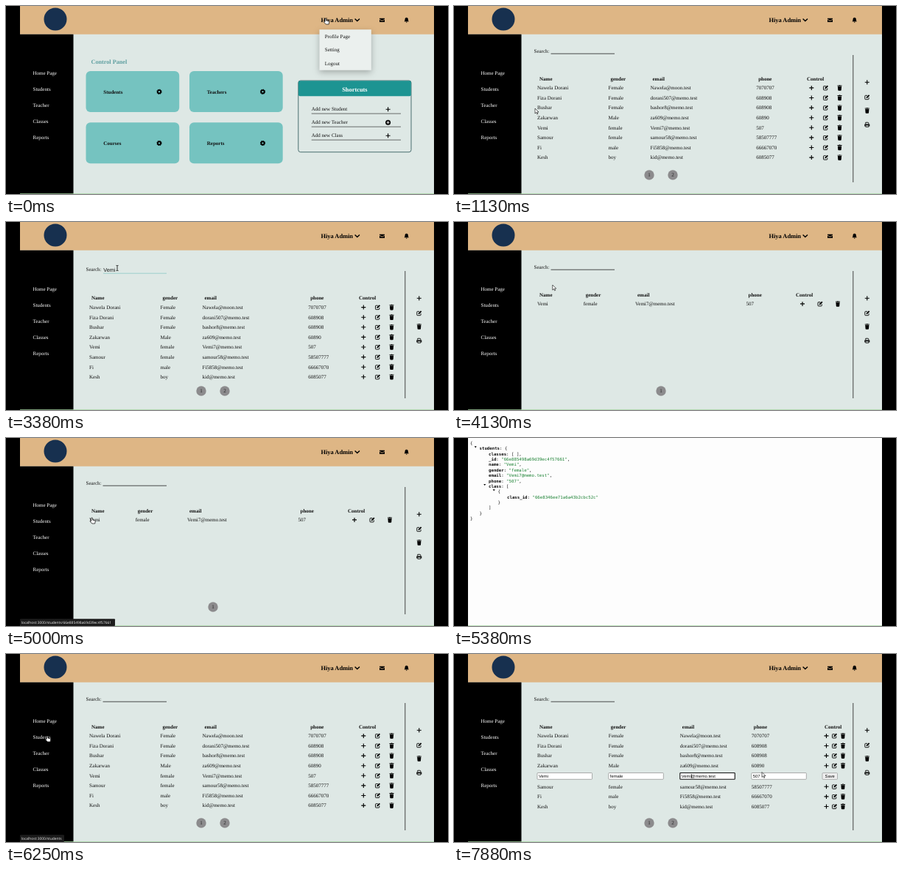
These frames come from a looping animation (600x257 px, 8 s). An HTML page:

```html
<!DOCTYPE html>
<html lang="en">
<head>
<meta charset="utf-8">
<title>School control panel</title>
<style>
  html, body { margin: 0; width: 100%; height: 100%; overflow: hidden; background: #000; }
  svg { display: block; width: 100vw; height: 100vh; }
  text { font-family: "Liberation Serif", "Times New Roman", serif; font-size: 7px; white-space: pre; text-rendering: geometricPrecision; }
  .bold { font-weight: bold; }
  .title { font-weight: bold; font-size: 8.4px; }
  .sans { font-family: "Liberation Sans", Arial, sans-serif; font-size: 5.83px; }
  .query { font-family: "Liberation Sans", Arial, sans-serif; font-size: 7.2px; }
  .status { font-family: "Open Sans", sans-serif; font-size: 4.93px; }
  .code { font-family: "DejaVu Sans Mono", monospace; font-size: 5.72px; }
</style>
</head>
<body>
<svg id="stage" viewBox="0 0 600 257" preserveAspectRatio="none"></svg>
<script>
const LOOP = 8000;
const BODY = '#dee8e5';

const rect = (x, y, w, h, fill, more = '') =>
  `<rect x="${x}" y="${y}" width="${w}" height="${h}" fill="${fill}" ${more}/>`;
const text = (x, y, str, cls = '', fill = '#111', more = '') =>
  `<text x="${x}" y="${y}" class="${cls}" fill="${fill}" ${more}>${str}</text>`;
const line = (x1, y1, x2, y2, color = '#222', width = 0.8) =>
  `<path d="M${x1} ${y1}L${x2} ${y2}" stroke="${color}" stroke-width="${width}"/>`;
const solid = d => `<path d="${d}"/>`;
const stroke = (d, width) => `<path d="${d}" fill="none" stroke="#000" stroke-width="${width}"/>`;

const ICONS = {
  plus: stroke('M0-3V3M-3 0H3', 1.1),
  edit: stroke('M.3-2.4H-2.2Q-3-2.4-3-1.6V2.2Q-3 3-2.2 3H1.5Q2.3 3 2.3 2.2V.4', 0.9) +
    solid('M-1.2 1.3l.3-1.6L2.2-3.4l1.3 1.3L.4 1Z'),
  trash: solid('M-3-3.4h2l.4-.5h1.2l.4.5h2v.9h-6ZM-2.6-2h5.2l-.4 5q-.1.8-.8.8h-2.8q-.7 0-.8-.8Z'),
  print: stroke('M-2-.8V-3H1.4L2-2.4V-.8', 0.9) + solid('M-3.5-.6h7v2.8h-1.1v-1.2h-4.8v1.2h-1.1Z') +
    stroke('M-2 1.2V3H2V1.2', 0.9),
  gear: '<g fill="none" stroke="#000"><circle r="2.1" stroke-width="1.8"/>' +
    '<circle r="3" stroke-width="1.2" stroke-dasharray="1.3 1.056"/></g>',
  add: '<circle r="3.5"/><path d="M0-2V2M-2 0H2" stroke="#fff" stroke-width=".9"/>',
  mail: solid('M-3.5-2.6h7v1L0 .6-3.5-1.6ZM-3.5-.7 0 1.5 3.5-.7v3.3h-7Z'),
  bell: solid('M0-3.5c-1.6.2-2.2 1.4-2.2 2.7 0 1.6-.5 2-1 2.8h6.4c-.5-.8-1-1.2-1-2.8 0-1.3-.6-2.5-2.2-2.7ZM-.9 2.5h1.8q-.1 1-.9 1t-.9-1Z'),
  chevron: stroke('M-3.2-1.6L0 1.6L3.2-1.6', 1.4),
  hand: '<path d="M-.9.9a.9.9 0 0 1 1.8 0V3l2.8.6q1.1.3 1 1.5L4.2 8H.3L-2.4 5q-.2-1.1.8-1L-.9 4.6Z" fill="#fff" stroke="#000" stroke-width=".7"/>',
  arrow: '<path d="M0 0V7l1.7-1.6L2.8 7.9l1.1-.5L2.8 5H5Z" fill="#fff" stroke="#000" stroke-width=".6"/>',
  beam: stroke('M-1.5-3.6Q0-3.6 0-3V3Q0 3.6-1.5 3.6M1.5-3.6Q0-3.6 0-3M0 3Q0 3.6 1.5 3.6', 0.8)
};
const icon = (name, x, y) => `<g transform="translate(${x} ${y})">${ICONS[name]}</g>`;

const PEOPLE = [
  ['Nawela Dorani', 'Female', 'Nawela@moon.test', '7070707'],
  ['Fiza Dorani', 'Female', 'dorani507@memo.test', '608908'],
  ['Bushar', 'Female', 'bashor8@memo.test', '608908'],
  ['Zakarwan', 'Male', 'za609@memo.test', '60890'],
  ['Vemi', 'female', 'Vemi7@memo.test', '507'],
  ['Samour', 'female', 'samour58@memo.test', '58507777'],
  ['Fi', 'male', 'Fi5858@memo.test', '66667070'],
  ['Kesh', 'boy', 'kid@memo.test', '6085077']
];
const MORE_PEOPLE = [
  ['Tolvi', 'vwtqn', 'vwtq@memo.test', '60858072'],
  ['kesh', 'baby', 'tiny@moonup.test', '700'],
  ['Vintoa', 'Female', 'vint@memo.test', '5072705'],
  ['DORN', 'Male', 'd609@memo.test', '585858'],
  ['oneUser', 'Male', 'one808@memo.test', '705055858']
];
// Column starts, then the three icon centres.
const TABLES = {
  first: { rows: PEOPLE, cols: [113, 209.5, 266.5, 410.2], head: 479, icons: [485.3, 504.5, 523.5] },
  second: { rows: MORE_PEOPLE, cols: [113, 183.8, 247.8, 387], head: 471.5, icons: [479, 500.7, 522.3] },
  found: { rows: [PEOPLE[4]], cols: [113, 175.7, 246, 396.5], head: 464, icons: [473, 497, 521] },
  edit: { rows: PEOPLE, cols: [113, 209.8, 306.8, 403.8], head: 503, icons: [505.5, 516.5, 528] }
};
const EDIT_ROW = 4;

function shell() {
  const links = ['Home Page', 'Students', 'Teacher', 'Classes', 'Reports'];
  return rect(19, 0, 562, 257, BODY) + rect(19, 0, 562, 38.7, '#deb685') +
    rect(18, 38.7, 73.5, 219, '#000') +
    '<circle cx="67" cy="18" r="15.5" fill="#17304f"/>' +
    text(427.5, 22, 'Hiya Admin', 'title', '#000') +
    icon('chevron', 476.8, 19) + icon('mail', 510.5, 19.3) + icon('bell', 543.7, 19.3) +
    links.map((s, i) => text(36.5, 94 + 22 * i, s, '', '#fff')).join('');
}

function dashboard(menuOpen) {
  const cards = ['Students', 'Teachers', 'Courses', 'Reports'].map((s, i) => {
    const x = 108.5 + 140.5 * (i % 2), y = 89 + 70.3 * (i >> 1);
    return rect(x, y, 126.7, 56, '#75c3c0', 'rx="6"') + text(x + 23.8, y + 30.5, s, 'bold') +
      icon('gear', x + 99.5, y + 28.2);
  }).join('');
  const shortcuts = rect(396.8, 102, 153.2, 97.7, 'none', 'rx="3" stroke="#4b6f70"') +
    rect(397, 102.3, 152.8, 20.9, '#1d9492', 'rx="2"') +
    text(473.4, 116.8, 'Shortcuts', 'title', '#fff', 'text-anchor="middle"') +
    ['Student', 'Teacher', 'Class'].map((s, i) => {
      const y = 143.2 + 18 * i;
      return text(414.7, y, 'Add new ' + s) + line(414.7, y + 3.9, 536, y + 3.9, '#333', 0.7) +
        icon(i === 1 ? 'add' : 'plus', 518.6, y - 2);
    }).join('');
  const menu = rect(425.5, 32.2, 70.3, 55.5, '#ebf0ee', 'style="filter:drop-shadow(0 3px 4px #0004)"') +
    ['Profile Page', 'Setting', 'Logout'].map((s, i) => text(432.8, 44 + 18.3 * i, s)).join('');
  return text(115.5, 79, 'Control Panel', 'title', '#5f9fa0', 'style="font-size:8.2px"') +
    cards + shortcuts + (menuOpen ? menu : '');
}

function searchBox(focused, query) {
  return focused
    ? text(108.5, 67.4, 'Search:') + line(132, 70.2, 218, 70.2, '#8cc9c6') + text(132.3, 67.6, query, 'query')
    : text(108.5, 64.4, 'Search:') + line(131.5, 65.2, 218, 65.2);
}

function editRow(row, cols, y, tick) {
  const trimmed = tick >= 61, active = tick >= 59;
  const values = trimmed ? row.map(s => s.replace('7@', '@')) : row;
  const fields = values.map((s, i) => {
    const border = active && i === 2 ? 'stroke="#111" stroke-width="1.1"' : 'stroke="#8c8c8c" stroke-width=".7"';
    return rect(cols[i], y - 4.5, 74.5, 8.8, '#fff', border + ' rx=".8"') + text(cols[i] + 2, y + 2, s, 'sans');
  }).join('');
  const caretX = trimmed ? 322.3 : 325.5;
  return fields + (active ? line(caretX, y - 3, caretX, y + 3, '#000', 0.7) : '') +
    rect(500, y - 4.4, 20.5, 8.8, '#efefef', 'rx="1" stroke="#888" stroke-width=".6"') +
    text(510.2, y + 2, 'Save', 'sans', '#111', 'text-anchor="middle"');
}

function studentsPage(kind, tick) {
  const { rows, cols, head, icons } = TABLES[kind];
  const focused = tick >= 24 && tick < 29;
  const top = focused ? 4.7 : 0;
  const query = tick < 26 ? '' : tick < 27 ? 'Ve' : 'Vemi';
  let out = searchBox(focused, query) + line(541.8, 67, 541.8, 241, '#333', 0.9) +
    ['plus', 'edit', 'trash', 'print'].map((s, i) => icon(s, 560.8, [104.3, 124.7, 143, 162.2][i])).join('');
  ['Name', 'gender', 'email', 'phone'].forEach((s, i) => out += text(cols[i] + 3, 101.6 + top, s, 'bold'));
  out += text(head, 101.6 + top, 'Control', 'bold');
  rows.forEach((row, i) => {
    const editing = kind === 'edit';
    const y = 111.9 + top + 13.6 * i + (editing && i > EDIT_ROW ? 1.4 : 0);
    if (editing && i === EDIT_ROW) { out += editRow(row, cols, y + 0.7, tick); return; }
    row.forEach((s, c) => out += text(cols[c], y + 2.3, s));
    ['plus', 'edit', 'trash'].forEach((s, c) => out += icon(s, icons[c], y));
  });
  const hovered = tick >= 13 && tick <= 16 ? 1 : tick >= 17 && tick <= 20 ? 0 : -1;
  (kind === 'found' ? [281] : [265, 297]).forEach((x, i) => {
    out += `<circle cx="${x}" cy="231" r="6.7" fill="${i === hovered ? '#555657' : '#8c8b8d'}"/>` +
      text(x, 233.4, i + 1, '', '#222', 'text-anchor="middle"');
  });
  return out;
}

function jsonPage() {
  const [name, gender, email, phone] = PEOPLE[EDIT_ROW];
  // Depth, key, string value or bracket, foldable.
  const lines = [
    [0, '', '{'], [1, 'students', '{', 1], [2, 'classes', '[ ],'],
    [2, '_id', '"66e885498a69d39ec4f57661"'], [2, 'name', `"${name}"`], [2, 'gender', `"${gender}"`],
    [2, 'email', `"${email}"`], [2, 'phone', `"${phone}"`], [2, 'class', '[', 1], [3, '', '{', 1],
    [4, 'class_id', '"66e8346ee71a6a43b2cbc52c"'], [3, '', '}'], [2, '', ']'], [1, '', '}'], [0, '', '}']
  ];
  return rect(19, 0, 562, 257, '#fdfdfd') + lines.map(([depth, key, value, fold], i) => {
    const x = 22 + 12.5 * depth, y = 7 + 7.36 * i;
    const quoted = value[0] === '"';
    const label = key && `<tspan font-weight="bold">${key}</tspan>: `;
    const shown = quoted ? `<tspan fill="#1c8234">${value}</tspan>` : value;
    const comma = quoted && key !== 'class_id' ? ',' : '';
    return text(x, y + 2, label + shown + comma, 'code') +
      (fold ? `<path d="M${x - 6.8} ${y - 3}h3l-1.5 2.2Z"/>` : '');
  }).join('');
}

function statusBar(path) {
  const width = path.length > 12 ? 129 : 60;
  return rect(19, 247.3, width, 9.7, '#1c1c1c', 'rx="1"') +
    text(20.8, 254.2, 'localhost:3000/' + path, 'status', '#f2f2f2');
}

// Pointer path: step, x, y, shape kept until the next entry.
const POINTER = [
  [0, 434, 17, 'hand'], [1, 405, 32, 'arrow'], [4, 57, 112, 'hand'], [8, 57, 112, 'hand'], [9, 110, 140, 'arrow'],
  [13, 295, 229, 'hand'], [16, 295, 229, 'hand'], [17, 265, 230, 'hand'], [20, 265, 230, 'hand'],
  [21, 245, 195, 'arrow'], [24, 151, 63, 'beam'], [30, 151, 63, 'arrow'], [36, 116.5, 109, 'hand'],
  [41, 116.5, 109, 'arrow'], [42, 38, 8, 'arrow'], [43, 0, 0, ''], [46, 30, 2, 'arrow'], [49, 56, 112, 'hand'],
  [51, 56, 112, 'hand'], [52, 150, 135, 'arrow'], [55, 504, 165, 'hand'], [56, 504, 165, 'arrow'],
  [59, 345, 167, 'beam'], [61, 345, 167, 'arrow'], [63, 418, 161.5, 'arrow']
];
function pointer(tick) {
  const i = POINTER.findLastIndex(p => p[0] <= tick);
  const a = POINTER[i], b = POINTER[i + 1] || a;
  if (!a[3]) return '';
  const k = b[3] && b !== a ? (tick - a[0]) / (b[0] - a[0]) : 0;
  return icon(a[3], a[1] + (b[1] - a[1]) * k, a[2] + (b[2] - a[2]) * k);
}

// Screen shown from each step on.
const SCREENS = [
  [0, 'dashboard'], [7, 'first'], [15, 'second'], [18, 'first'], [29, 'found'], [41, 'json'], [46, 'first'], [56, 'edit']
];
function scene(tick) {
  const screen = SCREENS.findLast(s => s[0] <= tick)[1];
  let out;
  if (screen === 'json') out = jsonPage();
  else out = shell() + (screen === 'dashboard' ? dashboard(tick < 2) : studentsPage(screen, tick));
  out += line(19, 256.6, 581, 256.6, '#a5d6a0', 0.8);
  if ((tick >= 4 && tick < 9) || (tick >= 49 && tick < 52)) out += statusBar('students');
  if (tick >= 36 && tick < 41) out += statusBar('students/66e885498a69d39ec4f57661');
  return out + pointer(tick);
}

const stage = document.getElementById('stage');
const start = performance.now();
let shown = -1;
function draw() {
  const t = (performance.now() - start) % LOOP;
  const tick = Math.floor(Math.floor(t / 10) / 12.5);
  if (tick !== shown) stage.innerHTML = scene(shown = tick);
  requestAnimationFrame(draw);
}
draw();
</script>
</body>
</html>
```
